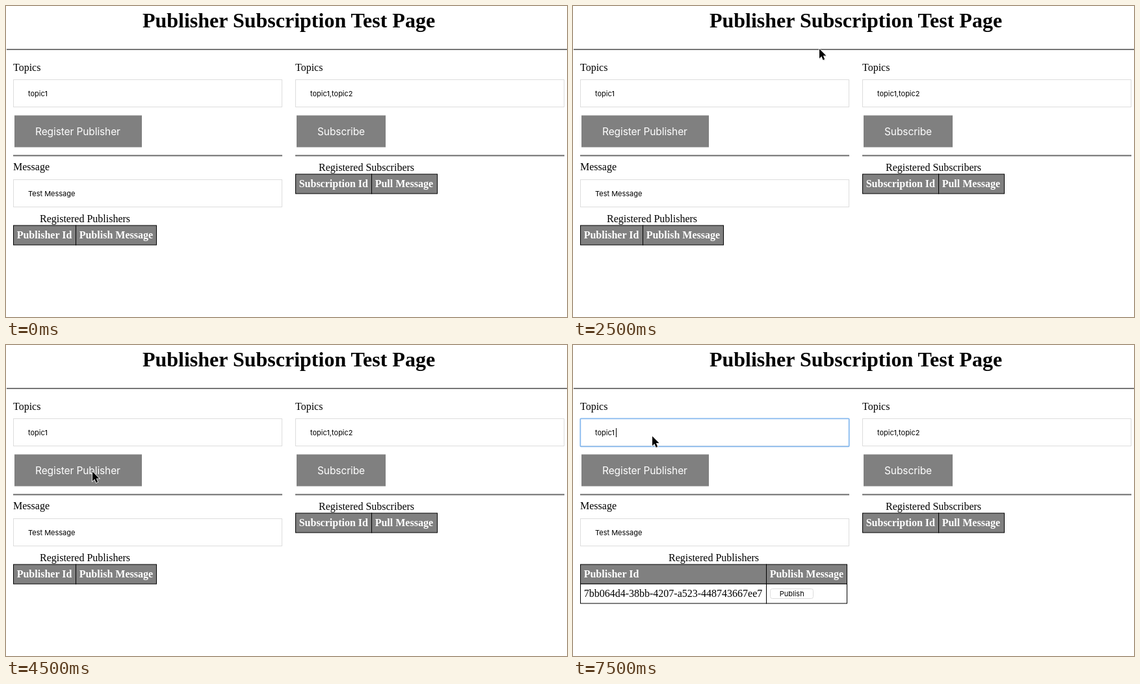
These frames come from a looping animation (863 by 479 pixels, 8000 ms). An HTML page:

```html
<!DOCTYPE html>
<html lang="en">
<head>
<meta charset="utf-8">
<title>Publisher Subscription Test Page</title>
<style>
  html, body { margin: 0; width: 100%; height: 100%; overflow: hidden; background: #fff; }
  svg { display: block; }
  text { font: 16px "Liberation Serif", serif; white-space: pre; }
  .title { font-size: 32px; font-weight: bold; }
  .head { font-weight: bold; fill: #fff; }
  .mid { text-anchor: middle; }
  .field { font: 11px Inter, sans-serif; }
  .button { font: 15.5px Inter, sans-serif; letter-spacing: -.1px; fill: #fff; }
  .cell { stroke: #000; }
</style>
</head>
<body>
<svg id="stage" width="863" height="479" viewBox="0 0 863 479"></svg>
<script>
const LOOP = 8000, REGISTERED = 5250, FOCUSED = 7500;
// Pointer tip: [time, x, y]
const pointerStops = [
  [500, 490, 258.5], [750, 491, 278], [1000, 510, 174], [1250, 512, 162],
  [2000, 508, 178.5], [2250, 388, 116], [2500, 379, 66], [3250, 441, 265.5],
  [3500, 231, 192], [4000, 159, 210], [4250, 135, 204.5], [4500, 133, 195],
  [7250, 122, 140.5]
];

const text = (x, y, label, cls = '') => `<text x="${x}" y="${y}" class="${cls}">${label}</text>`;
const rect = (x, y, w, h, attrs) => `<rect x="${x}" y="${y}" width="${w}" height="${h}" ${attrs}/>`;
const input = (x, y, value) =>
  rect(x + .5, y + .5, 413, 42, 'fill="#fff" stroke="#ddd"') + text(x + 23, y + 26, value, 'field');
const button = (x, w, label) =>
  rect(x, 168.5, w, 49, 'fill="#808080"') + text(x + 32, 199, label, 'button');
const rule = x => rect(x, 229.4, 414, 2, 'fill="#6c6c6c"');

function row(x, y, widths, labels, fill, cls) {
  return widths.map((w, i) => {
    const cell = rect(x + .5, y + .5, w, 30, `class="cell" fill="${fill}"`) + text(x + 5.7, y + 20, labels[i], cls);
    x += w;
    return cell;
  }).join('');
}

function table(x, y, caption, widths, labels) {
  const center = x + (widths[0] + widths[1] + 1) / 2;
  return text(center, y - 5, caption, 'mid') + row(x, y, widths, labels, '#808080', 'head');
}

const publishers = widths =>
  table(11, 337.5, 'Registered Publishers', widths, ['Publisher Id', 'Publish Message']);

document.getElementById('stage').innerHTML =
  text(435, 33, 'Publisher Subscription Test Page', 'title mid') +
  rect(1, 66.1, 862, 1.6, 'fill="#555"') +
  text(11, 100, 'Topics') + input(11, 113, 'topic1') + button(13, 196, 'Register Publisher') + rule(11) +
  text(445, 100, 'Topics') + input(445, 113, 'topic1,topic2') + button(447, 137, 'Subscribe') + rule(445) +
  text(11, 253, 'Message') + input(11, 267, 'Test Message') +
  table(445, 258.5, 'Registered Subscribers', [117, 101], ['Subscription Id', 'Pull Message']) +
  `<g id="empty">${publishers([96, 124])}</g>
  <g id="filled">${publishers([286, 124])}
    ${row(11, 367.5, [286, 124], ['7bb064d4-38bb-4207-a523-448743667ee7', ''], '#fff', '')}
    ${rect(303.5, 375.5, 66, 15, 'rx="3" fill="#fff" stroke="#ddd"')}
    ${text(336.7, 387, 'Publish', 'field mid')}
  </g>
  <g id="focus">
    ${rect(11.3, 113.3, 413.4, 43, 'rx="1" fill="none" stroke="#86b9ef" stroke-width="1.8"')}
    ${rect(66, 128, 1, 14, 'fill="#000"')}
  </g>
  <g id="pointer">
    <path d="M0 1V16.5L4 13 6 18.5 9 17.5 6.5 12H11Z" fill="#000" opacity=".18"/>
    <path d="M0 0V14.8L3.3 11.6 5.7 17.2 8.2 16.1 5.8 10.6H10.4Z" stroke="#fff" stroke-width="1.5" paint-order="stroke"/>
  </g>`;

const [empty, filled, focus, pointer] =
  ['empty', 'filled', 'focus', 'pointer'].map(id => document.getElementById(id));
const show = (el, on) => { el.style.display = on ? '' : 'none'; };
const start = performance.now();

function draw() {
  const t = (performance.now() - start) % LOOP;
  show(empty, t < REGISTERED);
  show(filled, t >= REGISTERED);
  show(focus, t >= FOCUSED);
  const stop = pointerStops.filter(([time]) => time <= t).pop();
  show(pointer, stop);
  if (stop) pointer.setAttribute('transform', `translate(${stop[1]} ${stop[2]})`);
  requestAnimationFrame(draw);
}
draw();
</script>
</body>
</html>
```
